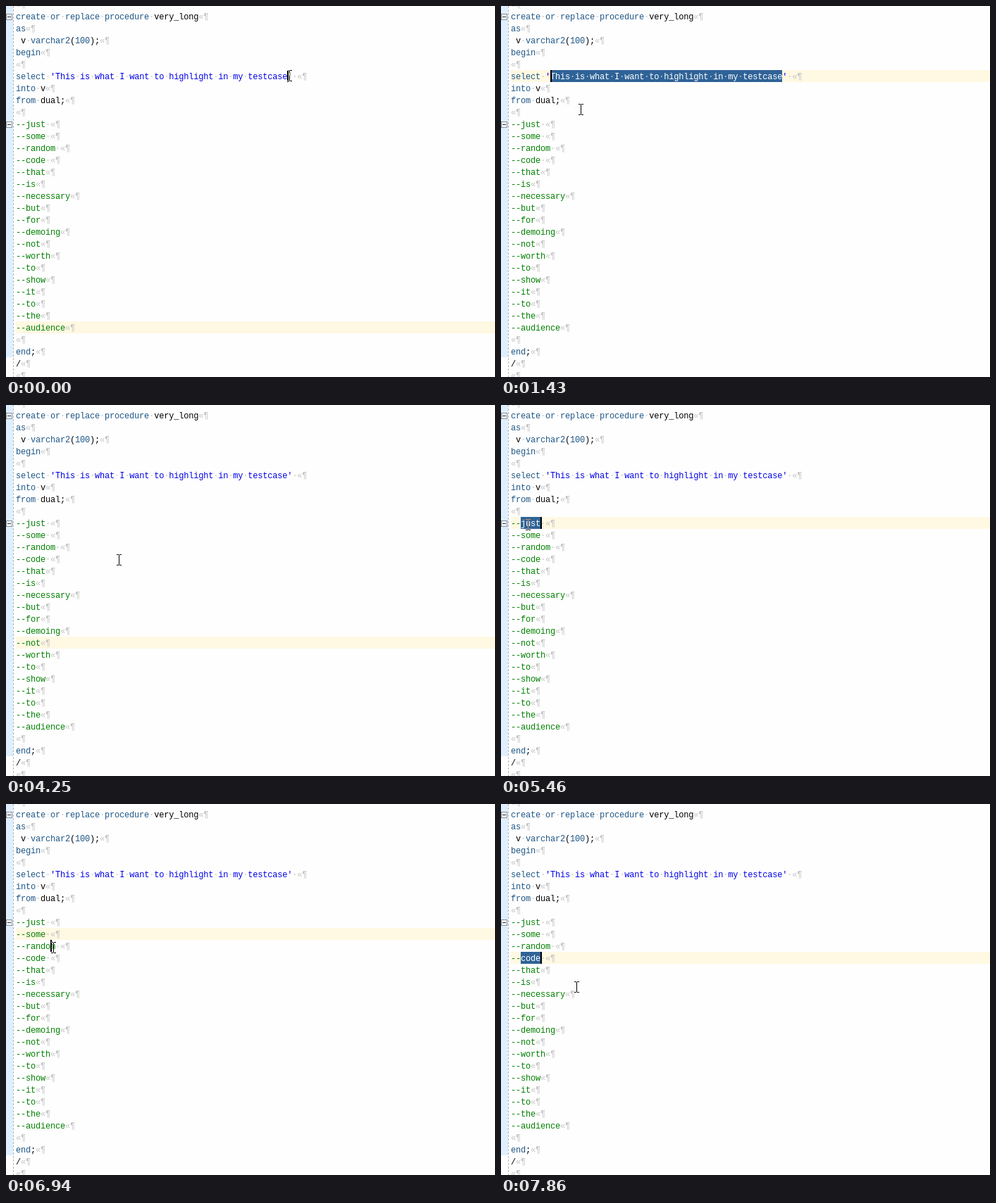
An HTML page for the animation above (8000 ms loop, 694 px wide and 527 px high).

```html
<!DOCTYPE html>
<html lang="en">
<head>
<meta charset="utf-8">
<title>Editor selection demo</title>
<style>
  html, body { margin: 0; width: 100%; height: 100%; overflow: hidden; background: #fefefe; }
  #stage {
    position: relative; width: 694px; height: 527px; overflow: hidden;
    background: #fefefe; isolation: isolate;
    font: 12px/17px "Liberation Mono", monospace; letter-spacing: -0.2px;
  }
  #stage div { position: absolute; }
  #gutter { left: 0; top: 0; width: 10px; height: 499px; background: #dfefff; }
  #rule {
    left: 10px; top: 0; width: 1px; height: 527px;
    background: repeating-linear-gradient(#b4b4b4 0 3px, transparent 3px 5px);
  }
  .fold {
    left: 0; width: 7px; height: 7px;
    background: #f6faff; border: 1px solid #8593a0;
  }
  .fold::after {
    content: ""; position: absolute; left: 1px; top: 3px;
    width: 5px; height: 1px; background: #333;
  }
  #bar { left: 14px; width: 680px; height: 17px; background: #fff8e2; }
  .line { left: 14px; height: 17px; padding-top: 2px; white-space: pre; color: #000; }
  .k { color: #1f5786; }
  .s { color: #0000e6; }
  .c { color: #008000; }
  .w { color: #c4c4c4; }
  #sel { height: 17px; overflow: hidden; background: #2f6397; }
  #sel .line { left: 0; top: 0; color: #fff; }
  #sel .w { color: #c4d2e0; }
  #caret { width: 2px; height: 17px; background: #000; }
  #mouse { left: 0; top: 0; width: 7px; height: 16px; mix-blend-mode: difference; }
  #mouse svg { display: block; }
</style>
</head>
<body>
<div id="stage">
  <div id="gutter"></div>
  <div id="rule"></div>
  <div id="bar"></div>
  <div id="text" style="left:0;top:0"></div>
  <div id="sel"></div>
  <div id="caret"></div>
  <div id="mouse">
    <svg width="7" height="16" fill="#fff" shape-rendering="crispEdges">
      <path d="M0 0h3v1h1v-1h3v1h-3v14h3v1h-3v-1h-1v1h-3v-1h3v-14h-3z"/>
    </svg>
  </div>
</div>
<script>
const LOOP = 8000, LEFT = 14, TOP = 6, CHAR = 7, ROW = 17;
const STEP = 135, BLINK = 470;
const DRAG_END = 1120, RELEASE = 1430;
const $ = id => document.getElementById(id);

const comments = ["just ", "some ", "random ", "code "].concat(
  "that is necessary but for demoing not worth to show it to the audience".split(" "));
const phrase = "This is what I want to highlight in my testcase";
const lines = [
  "create or replace procedure very_long", "as", " v varchar2(100);", "begin", "",
  `select '${phrase}' `, "into v", "from dual;", "",
  ...comments.map(s => "--" + s), "", "end;", "/", ""
];

const TOKEN = /(--\w+)|('[^']*')|\b(?:create|or|replace|procedure|as|varchar2|begin|select|into|from|end|\d+)\b/g;
const span = (cls, s) => `<span class="${cls}">${s}</span>`;
const showSpaces = s => s.replace(/(?<=\S) /g, "·").replace(/·/g, span("w", "·"));
const paint = s => s
  .replace(/(?<=\S) /g, "·")
  .replace(TOKEN, (m, comment, str) => `<i>${comment ? "c" : str ? "s" : "k"}</i>${m}<b>`)
  .replace(/·/g, span("w", "·"))
  .replace(/<i>(.)<\/i>/g, '<span class="$1">')
  .replace(/<b>/g, "</span>") + span("w", "«¶");

const rowY = row => TOP + row * ROW;
const colX = col => LEFT + col * CHAR;
const lineHtml = (s, row) => `<div class="line" style="top:${rowY(row)}px">${paint(s)}</div>`;

$("text").innerHTML = lineHtml("", -1) + lines.map(lineHtml).join("");
for (const text of ["create", "--just"]) {
  const box = document.createElement("div");
  box.className = "fold";
  box.style.top = rowY(lines.findIndex(s => s.startsWith(text))) + 5 + "px";
  $("stage").append(box);
}

// Pointer strokes; each starts where the previous one ended.
const home = { x: 402, y: 99 };
const moves = [
  { from: 10, to: DRAG_END, x: 74, y: 101 },
  { from: RELEASE, to: RELEASE, x: 113, y: 147 },
  { from: 1440, to: 2130, x: 425, y: 337 },
  { from: 3990, to: 4250, x: 160, y: 220 },
  { from: 4250, to: 4660, x: 24, y: 174 },
  { from: 4660, to: 4790, x: 38, y: 170 },
  { from: 5460, to: 6120, x: 42, y: 187 },
  { from: 6530, to: 6940, x: 67, y: 204 },
  { from: 7080, to: 7320, x: 42, y: 220 },
  { from: 7600, to: 7860, x: 107, y: 260 }
];
// A click places the caret; the row lights up at `lit`, a double click also picks the word.
const clicks = [
  { at: 3580, lit: 3720 },
  { at: 5190, lit: 5460, twice: true },
  { at: 6400, lit: 6530, twice: true },
  { at: 6940, lit: 7080, twice: true },
  { at: 7470, lit: 7600, twice: true }
];

function pointer(t) {
  let p = home;
  for (const m of moves) {
    if (t < m.from) break;
    if (t >= m.to) { p = m; continue; }
    const k = Math.floor((t - m.from) / STEP) * STEP / (m.to - m.from);
    return { x: Math.round(p.x + (m.x - p.x) * k), y: Math.round(p.y + (m.y - p.y) * k) };
  }
  return p;
}

const rowAt = p => Math.floor((p.y - TOP) / ROW);
const colAt = p => Math.floor((p.x - LEFT) / CHAR);
const dragRow = lines.findIndex(s => s.includes(phrase));
const dragEnd = lines[dragRow].indexOf(phrase) + phrase.length;

function barRow(t) {
  const click = clicks.filter(c => c.lit <= t).pop();
  if (click) return rowAt(pointer(click.at));
  return t < RELEASE ? lines.indexOf("--audience") : dragRow;
}

// Caret and selection; `since` restarts the blinking.
function editing(t) {
  const click = clicks.filter(c => c.at <= t).pop();
  if (!click) {
    const col = colAt(pointer(Math.min(t, DRAG_END)));
    return { row: dragRow, col, from: col, to: dragEnd, since: Math.min(t, DRAG_END) };
  }
  const p = pointer(click.at), row = rowAt(p), end = lines[row].trimEnd().length;
  if (click.twice && t >= click.lit) return { row, col: end, from: 2, to: end, since: click.lit };
  return { row, col: Math.min(colAt(p), end), from: 0, to: 0, since: click.at };
}

function place(el, visible, row, col) {
  el.style.display = visible ? "block" : "none";
  el.style.left = colX(col) + "px";
  el.style.top = rowY(row) + "px";
}

function draw(t) {
  const p = pointer(t), e = editing(t);
  $("mouse").style.transform = `translate(${p.x - 3}px, ${p.y - 8}px)`;
  $("bar").style.top = rowY(barRow(t)) + "px";
  place($("caret"), Math.floor((t - e.since) / BLINK) % 2 === 0, e.row, e.col);
  place($("sel"), e.from < e.to, e.row, e.from);
  $("sel").style.width = (e.to - e.from) * CHAR + "px";
  $("sel").innerHTML = `<div class="line">${showSpaces(lines[e.row].slice(e.from, e.to))}</div>`;
}

const start = performance.now();
function frame() {
  draw((performance.now() - start) % LOOP);
  requestAnimationFrame(frame);
}
frame();
</script>
</body>
</html>
```
